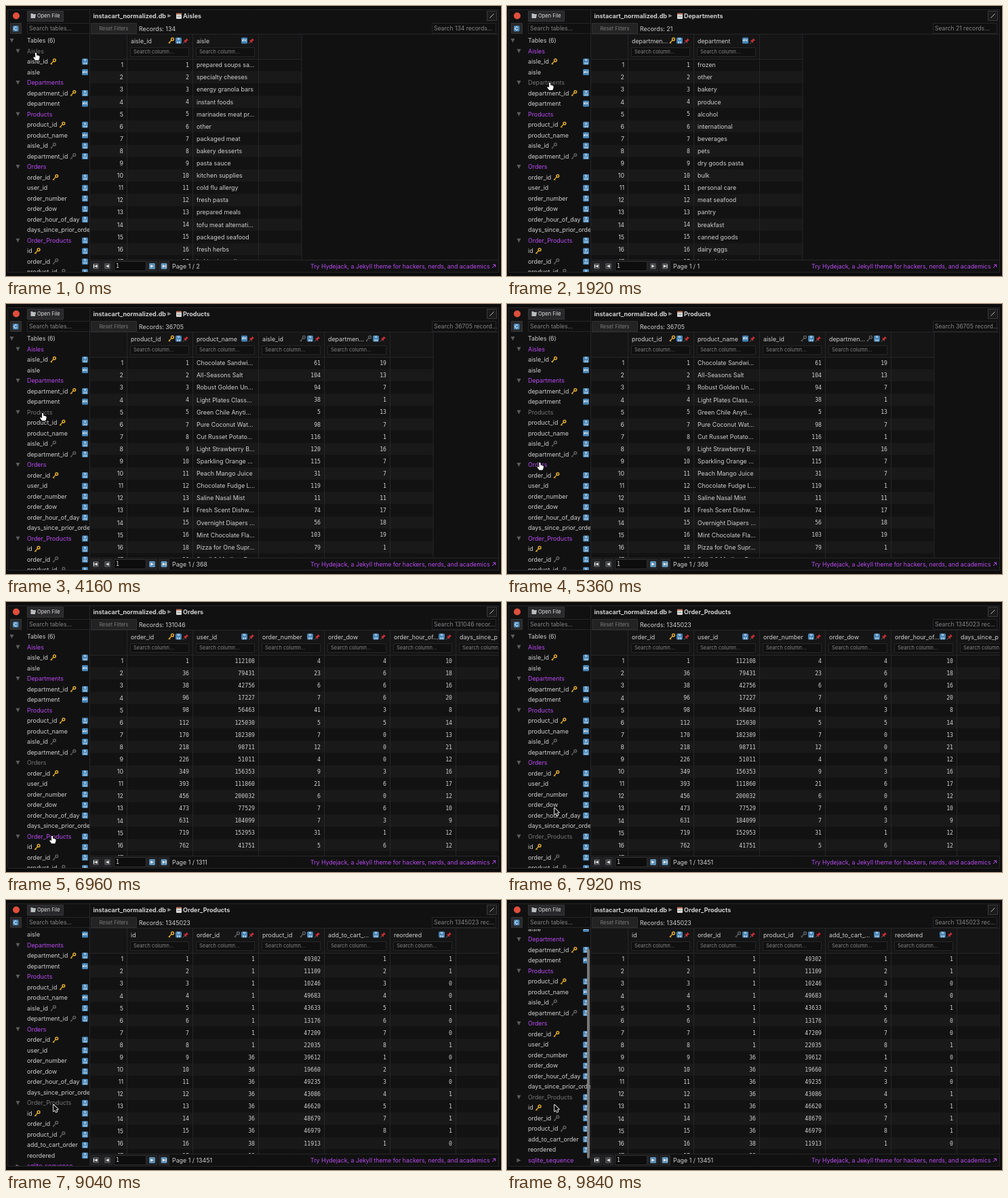
Write an HTML page with a canvas that moves like this. It is 730 px wide and 398 px high and loops after 9920 ms.

```html
<!DOCTYPE html>
<html lang="en">
<head>
<meta charset="utf-8">
<title>Database viewer</title>
<style>
html, body { margin: 0; height: 100%; overflow: hidden; background: #0c0c0d; }
canvas { display: block; }
</style>
</head>
<body>
<canvas id="stage" width="730" height="398"></canvas>
<script>
const g = document.getElementById('stage').getContext('2d');
const LOOP = 9920, PURPLE = '#b94aee', TEXT = '#cfcfcf', DIM = '#757575', LINE = '#262628';
const SANS = 'Inter, sans-serif', MONO = '"DejaVu Sans Mono", monospace';
const words = s => s.split(' ');
const rows = (n, f) => Array.from({ length: n }, (_, i) => f(i));
const count = n => rows(n, i => i + 1);

// Columns: [name, icons, values, left-aligned]; icons: k key, f foreign key, n number, a text
const aisles = ['prepared soups sa…', 'specialty cheeses', 'energy granola bars', 'instant foods', 'marinades meat pr…',
  'other', 'packaged meat', 'bakery desserts', 'pasta sauce', 'kitchen supplies', 'cold flu allergy', 'fresh pasta',
  'prepared meals', 'tofu meat alternati…', 'packaged seafood', 'fresh herbs', 'baking ingredients'];
const departments = ['frozen', 'other', 'bakery', 'produce', 'alcohol', 'international', 'beverages', 'pets',
  'dry goods pasta', 'bulk', 'personal care', 'meat seafood', 'pantry', 'breakfast', 'canned goods', 'dairy eggs', 'household'];
const products = ['Chocolate Sandwi…', 'All-Seasons Salt', 'Robust Golden Un…', 'Light Plates Class…', 'Green Chile Anyti…',
  'Pure Coconut Wat…', 'Cut Russet Potato…', 'Light Strawberry B…', 'Sparkling Orange …', 'Peach Mango Juice',
  'Chocolate Fudge L…', 'Saline Nasal Mist', 'Fresh Scent Dishw…', 'Overnight Diapers …', 'Mint Chocolate Fla…',
  'Pizza for One Supr…', 'Small & Medium D…'];
const tables = {
  Aisles: [['aisle_id', 'kn', count(17)], ['aisle', 'a', aisles, true]],
  Departments: [['departmen…', 'kn', count(17)], ['department', 'a', departments, true]],
  Products: [
    ['product_id', 'kn', rows(17, i => i + 1 + (i > 4) + (i > 14))],
    ['product_name', 'a', products, true],
    ['aisle_id', 'fn', words('61 104 94 38 5 98 116 120 115 31 119 11 74 56 103 79')],
    ['departmen…', 'fn', words('19 13 7 1 13 7 1 16 7 7 1 11 17 18 19 1')]],
  Orders: [
    ['order_id', 'kn', words('1 36 38 96 98 112 170 218 226 349 393 456 473 631 719 762')],
    ['user_id', 'n', words('112108 79431 42756 17227 56463 125030 182389 98711 51011 156353 111860 200032 77529 184099 152953 41751')],
    ['order_number', 'n', words('4 23 6 7 41 5 7 12 4 9 21 6 7 7 31 5')],
    ['order_dow', 'n', [...'4666350003606316']],
    ['order_hour_of…', 'n', words('10 18 16 20 8 14 13 21 12 16 17 12 10 9 12 12')],
    ['days_since_p', '', []]],
  Order_Products: [
    ['id', 'kn', count(17)],
    ['order_id', 'fn', rows(17, i => i < 8 ? 1 : i < 15 ? 36 : 38)],
    ['product_id', 'fn', words('49302 11109 10246 49683 43633 13176 47209 22035 39612 19660 49235 43086 46620 48679 46979 11913')],
    ['add_to_cart_…', 'n', [...'1234567812345781']],
    ['reordered', 'n', [...'1100100101011110']]]
};
tables.Orders[3][2] = [...'4666350003606316'].map((d, i) => [4, 6, 6, 6, 3, 5, 0, 0, 0, 3, 6, 0, 6, 3, 1, 6][i]);

// Views: [start, table, data table, records, search hint, pages]
const views = [
  [0, 'Aisles', 'Aisles', 134, 'records…', 2],
  [1440, 'Departments', 'Departments', 21, 'records…', 1],
  [3440, 'Products', 'Products', 36705, 'record…', 368],
  [5680, 'Orders', 'Orders', 131046, 'recor…', 1311],
  [7520, 'Order_Products', 'Orders', 1345023, 'rec…', 13451],
  [8640, 'Order_Products', 'Order_Products', 1345023, 'rec…', 13451]];

// Tree rows: # table, ~ closed table; the suffix after : lists icons
const tree = words('#Aisles aisle_id:kn aisle:a #Departments department_id:kn department:a #Products product_id:kn ' +
  'product_name:a aisle_id:fn department_id:fn #Orders order_id:kn user_id:n order_number:n order_dow:n ' +
  'order_hour_of_day:n days_since_prior_order #Order_Products:n id:kn order_id:fn product_id:fn ' +
  'add_to_cart_order:n reordered:n ~sqlite_sequence');

// Keyframes: time, then values
const cursorPath = [[0, 44, 69], [800, 44, 69], [1280, 63, 113], [2800, 63, 113], [3280, 54, 161], [4880, 54, 161],
  [5440, 48, 238], [6320, 48, 238], [6880, 68, 345], [7640, 68, 345], [7960, 70, 302]];
const scrollPath = [[8000, 0], [8320, 26.5], [8480, 26.5], [8800, 46.5], [9440, 46.5], [9680, 55]];

function at(path, t) {
  const i = path.findIndex(k => k[0] > t);
  if (i < 0) return path[path.length - 1].slice(1);
  if (i === 0) return path[0].slice(1);
  const a = path[i - 1], b = path[i], p = (t - a[0]) / (b[0] - a[0]), e = p * p * (3 - 2 * p);
  return a.slice(1).map((v, j) => v + (b[j + 1] - v) * e);
}

function text(s, x, y, { color = TEXT, size = 8.85, weight = 400, font = SANS, align = 'left' } = {}) {
  g.font = `${weight} ${size}px ${font}`;
  g.fillStyle = color;
  g.textAlign = align;
  g.fillText(s, x, y + size * 0.36);
  return g.measureText(s).width;
}

function box(x, y, w, h, fill, stroke, r = 0) {
  g.beginPath();
  g.roundRect(x, y, w, h, r);
  if (fill) { g.fillStyle = fill; g.fill(); }
  if (stroke) { g.strokeStyle = stroke; g.lineWidth = 1; g.stroke(); }
}

function poly(points, fill, stroke, width = 1) {
  g.beginPath();
  points.forEach(p => g.lineTo(...p));
  g.closePath();
  if (stroke) { g.strokeStyle = stroke; g.lineWidth = width; g.lineJoin = 'round'; g.stroke(); }
  if (fill) { g.fillStyle = fill; g.fill(); }
}

function line(x1, y1, x2, y2, color = LINE, width = 1) {
  g.beginPath();
  g.moveTo(x1, y1);
  g.lineTo(x2, y2);
  g.strokeStyle = color;
  g.lineWidth = width;
  g.stroke();
}

function clipped(x, y, w, h, draw) {
  g.save();
  g.beginPath();
  g.rect(x, y, w, h);
  g.clip();
  draw();
  g.restore();
}

function key(x, y, color) {
  line(x - 3.8, y + 3.8, x + 1, y - 1, color, 1.3);
  line(x - 2.8, y + 2.8, x - 1.4, y + 4, color, 1.1);
  g.beginPath();
  g.arc(x + 2, y - 2, 1.9, 0, 7);
  g.lineWidth = 1.5;
  g.stroke();
}

function icon(kind, x, y) {
  if (kind === 'k') return key(x, y, '#e0a92e');
  if (kind === 'f') return key(x, y, '#5a5b5c');
  if (kind === 'p') {
    line(x - 4, y + 4, x - 1, y + 1, '#888', 0.8);
    poly([[x - 3.2, y - 0.8], [x, y - 1.4], [x + 1, y - 4], [x + 4, y - 1], [x + 1.4, y], [x + 0.8, y + 3.2]], '#cb2f35');
    return;
  }
  const style = { color: '#f2f6fa', weight: 700, align: 'center' };
  box(x - 4.5, y - 4.5, 9, 9, '#4583b4', null, 1.5);
  if (kind === 'a') return text('abc', x, y - 0.2, { ...style, size: 4.2 });
  text('12', x, y - 2, { ...style, size: 4 });
  text('34', x, y + 2.1, { ...style, size: 4 });
}

function triangle(x, y, dir, color = '#5c5c5c', r = 3) {
  const turn = { right: 0, down: 1, left: 2 }[dir] * Math.PI / 2;
  g.save();
  g.translate(x, y);
  g.rotate(turn);
  poly([[-r, -r], [r, 0], [-r, r]], color);
  g.restore();
}

function sidebar(active, scroll, t) {
  clipped(3, 43, 121, 349, () => {
    triangle(8.5, 51 - scroll, 'down');
    text('Tables (6)', 31, 51 - scroll);
    tree.forEach((item, i) => {
      const y = 66.5 + i * 15.51 - scroll;
      const isTable = /^[#~]/.test(item);
      const [name, icons = ''] = item.replace(/^[#~]/, '').split(':');
      const color = !isTable ? TEXT : name === active ? DIM : PURPLE;
      if (isTable) triangle(17.5, y, item[0] === '#' ? 'down' : 'right');
      const w = text(name, 31, y, { color });
      for (const kind of icons) icon(kind, 'kf'.includes(kind) ? 31 + w + 7.5 : 116.5, y);
    });
    if (t > 9440) {
      g.globalAlpha = Math.min(1, (t - 9440) / 160);
      box(118, 17 + scroll, 4, 309, '#777', null, 2);
      g.globalAlpha = 1;
    }
  });
}

function table(columns) {
  const width = columns.length * 97 + 119;
  clipped(124, 42, 603, 333, () => {
    box(124, 42, width - 0.5, 36, '#151516');
    for (let i = 0; i < 17; i++) {
      const y = 78 + i * 18.1, mid = y + 9.1;
      box(124, y, width - 0.5, 18.1, i % 2 ? '#191919' : '#121212');
      text(i + 1, 173, mid, { align: 'right' });
      columns.forEach(([, , values, left], c) => {
        if (values[i] === undefined) return;
        if (left) text(values[i], 281 + (c - 1) * 97, mid);
        else text(values[i], 270 + c * 97, mid, { font: MONO, size: 8.2, align: 'right' });
      });
    }
    line(124, 78.5, 124 + width, 78.5);
    columns.forEach(([name, icons], c) => {
      const x = 184 + c * 97;
      line(x - 5.5, 42, x - 5.5, 375);
      text(name, x, 51.5);
      for (const kind of icons) icon(kind, x + ('kf'.includes(kind) ? 59.5 : 70.5), 51);
      if (icons) icon('p', x + 81, 51.5);
      box(x - 0.5, 61.5, 86, 13, '#101011', LINE);
      text('Search column…', x + 4, 67.7, { color: '#858585', size: 7.5 });
    });
    line(178.5 + columns.length * 97, 42, 178.5 + columns.length * 97, 375);
    line(123.5 + width - 0.5, 42, 123.5 + width - 0.5, 375);
  });
}

function toolbar([, name, , records, hint]) {
  g.beginPath();
  g.arc(15, 14.5, 5, 0, 7);
  g.fillStyle = '#e04f3c';
  g.fill();
  box(31.5, 7.5, 53, 15, '#29292b', '#353537');
  poly([[36.5, 11], [39, 11], [40, 12], [44, 12], [43, 18], [36.5, 18]], '#b9bdc0');
  text('Open File', 46, 14.7, { size: 7.5, color: '#e2e2e2' });
  box(6.5, 25.5, 16, 15, '#29292b', '#353537');
  box(10, 29, 8.5, 8.5, '#4b88b8', null, 1.5);
  g.beginPath();
  g.arc(14.2, 33.2, 2.3, 0.5, 5.6);
  g.strokeStyle = '#fff';
  g.stroke();
  box(31.5, 25.5, 92, 15, '#101011', LINE);
  text('Search tables…', 34, 33, { color: '#858585', size: 8.6 });

  const w = text('instacart_normalized.db', 128.5, 14.7, { weight: 700, size: 9 });
  triangle(132 + w + 1.5, 14.5, 'right', '#8a8a8a', 2.7);
  box(251, 11, 8, 8, '#d9d9d6', null, 1);
  box(251, 10.5, 8, 2, '#b56b4d');
  line(252.5, 15.5, 257.5, 15.5, '#8d9295');
  text(name, 261, 14.7, { weight: 700, size: 9 });
  box(709.5, 7.5, 14, 14, '#1b1b1c', '#39393b');
  line(713.5, 17.5, 719.5, 11.5, '#bbb');

  box(125.5, 25.5, 67, 15, '#232324', '#303032');
  text('Reset Filters', 159, 33.5, { color: '#7d7d7d', size: 7.4, align: 'center' });
  text('Records: ' + records, 196, 33.5);
  box(628.5, 25.5, 94, 15, '#101011', LINE);
  text(`Search ${records} ${hint}`, 631, 33, { color: '#858585', size: 8.6 });
}

function pager(pages) {
  const blue = pages > 1 ? '#5b8fb5' : '#4a4c4e';
  const button = (x, dir, bar, color) => {
    box(x - 7.5, 376.5, 15, 14, '#1f1f21', '#2c2c2e');
    box(x - 4.5, 379, 9, 9, color, null, 1.5);
    triangle(x, 383.5, dir, '#eee', 2.2);
    if (bar) line(x + bar * 3, 381, x + bar * 3, 386, '#eee');
  };
  line(124, 374.5, 727, 374.5);
  button(132.5, 'left', -1, '#4a4c4e');
  button(149.5, 'left', 0, '#4a4c4e');
  box(159.5, 376.5, 47, 14, '#0d0d0e', '#333335');
  text('1', 162, 383.2, { font: MONO, size: 8.2 });
  button(215.5, 'right', 0, blue);
  button(233, 'right', 1, blue);
  text('Page 1 / ' + pages, 245, 384);
  text('Try Hydejack, a Jekyll theme for hackers, nerds, and academics', 449, 384, { color: PURPLE, size: 8.75 });
  line(717, 386, 721.5, 381.5, PURPLE);
  g.beginPath();
  g.moveTo(718, 381.3);
  g.lineTo(721.7, 381.3);
  g.lineTo(721.7, 385);
  g.stroke();
}

function pointer([x, y], t) {
  const overTable = t < 7720 && [66.5, 113, 159.5, 237, 346].some(row => Math.abs(row - y) < 8);
  const shape = overTable
    ? [[-1, 0], [1, 0], [1.4, 4], [3, 3.8], [4.4, 4.6], [5.6, 5], [5.4, 8], [4.2, 11], [-0.8, 11], [-3.8, 7], [-3, 6], [-0.8, 7]]
    : [[0, 0], [0, 9.4], [2.2, 7.4], [3.7, 10.7], [5.3, 10], [3.8, 6.8], [6.8, 6.6]];
  const points = shape.map(p => [x + p[0], y + p[1]]);
  if (overTable) poly(points, '#fff', '#111', 1.6);
  else poly(points, '#111', '#eee', 1.8);
}

function draw(now) {
  const t = now % LOOP;
  const view = views.findLast(v => v[0] <= t);
  box(0, 0, 730, 398, '#0c0c0d');
  box(2.5, 5.5, 724, 387, '#111112', LINE);
  sidebar(view[1], at(scrollPath, t)[0], t);
  table(tables[view[2]]);
  toolbar(view);
  pager(view[5]);
  line(123.5, 6, 123.5, 392);
  line(124, 41.5, 727, 41.5);
  pointer(at(cursorPath, t), t);
  requestAnimationFrame(draw);
}
requestAnimationFrame(draw);
</script>
</body>
</html>
```
